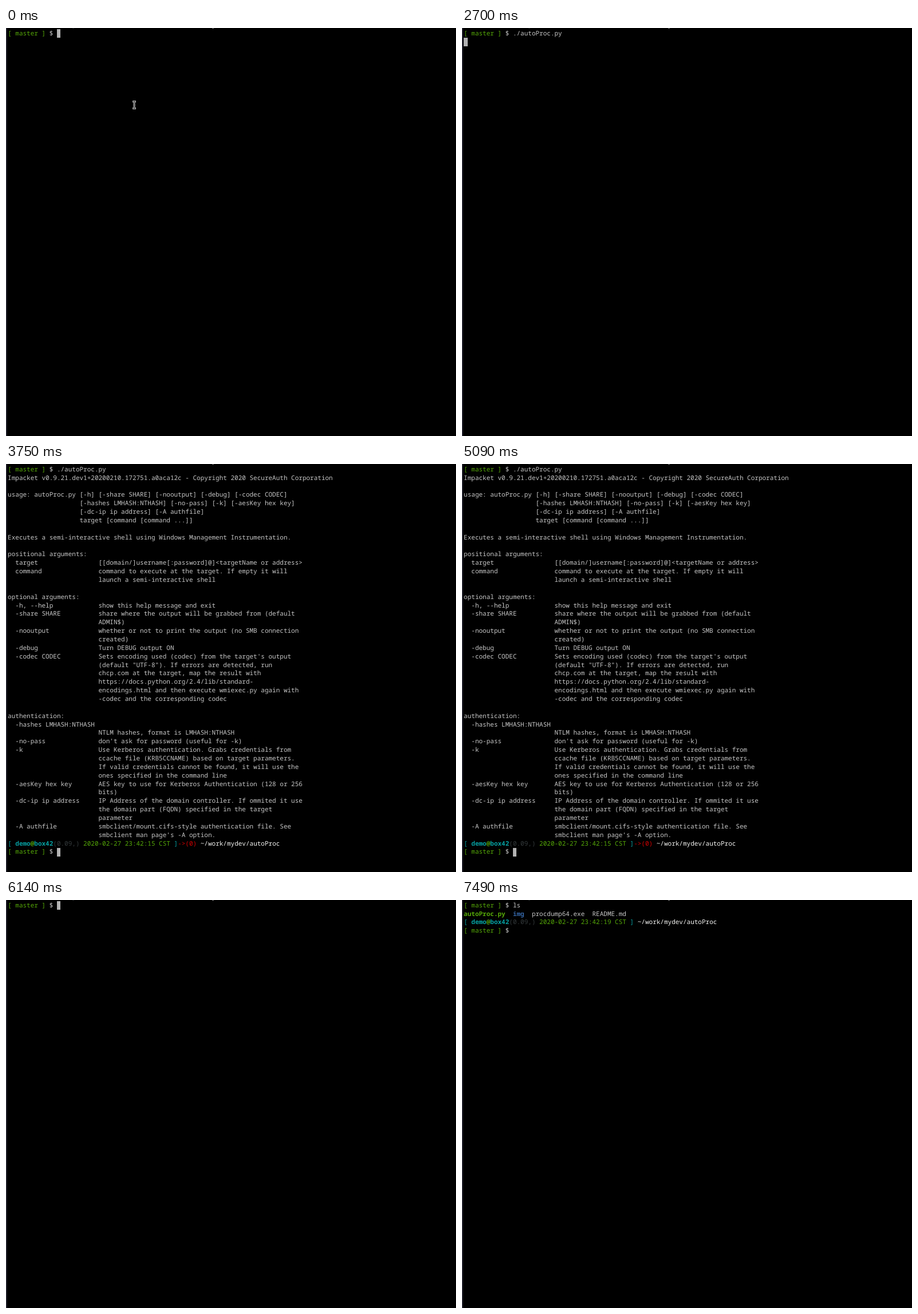
Animation, 786 px wide and 713 px high, one loop 8 s. Source, as an HTML page:

```html
<!DOCTYPE html>
<html lang="en">
<head>
<meta charset="utf-8">
<title>Terminal session</title>
<style>
  html, body { margin: 0; width: 100%; height: 100%; overflow: hidden; background: #000; }
  #stage { position: relative; width: 786px; height: 713px; overflow: hidden; background: #000; }
  #stage > * { position: absolute; }
  #edge { left: 0; top: 0; width: 2px; height: 100%; background: #20202a; }
  .speck { top: 0; height: 1px; width: 3px; }
  #screen {
    left: 3.1px; top: 2.75px; margin: 0; color: #c6c6c6;
    font: 500 11px/14.86px "Noto Sans Mono", monospace;
    text-rendering: geometricPrecision; font-variant-ligatures: none;
  }
  #cursor { width: 6.6px; height: 14.86px; background: #b2b2b2; }
  #pointer { left: 219px; top: 126px; }
  .green { color: #55a808; }
  .cyan { color: #06a0a2; }
  .blue { color: #3465a4; }
  .red { color: #d40000; }
  .dim { color: #343a3c; }
  .white { color: #f4f4f2; }
</style>
</head>
<body>
<div id="stage">
  <div id="edge"></div>
  <div class="speck" style="left:116px; background:#1c2021"></div>
  <div class="speck" style="left:360px; background:#777"></div>
  <pre id="screen"></pre>
  <div id="cursor"></div>
  <svg id="pointer" width="10" height="18" fill="none">
    <path d="M2 2.5H8M5 2.5V14.5M2 14.5H8" stroke="#ccc" stroke-width="3"/>
    <path d="M2.5 2.5H7.5M5 2.5V14.5M2.5 14.5H7.5" stroke="#222"/>
  </svg>
</div>
<script>
const LOOP = 8000, CELL = 6.6, ROW = 14.86, LEFT = 3.1, TOP = 2;

const paint = (color, text) => `<span class="${color}">${text}</span>`;
const bold = (color, text) => `<b class="${color}">${text}</b>`;

const prompt = paint("green", "[ master ]") + " $ ";
const PROMPT_COLS = 13;

const status = (time, code = " ") =>
  paint("cyan", "[ ") + bold("cyan", "demo") + bold("green", "@") + bold("cyan", "box42") +
  paint("dim", "(0.09,)") + paint("green", ` 2020-02-27 ${time} CST `) + paint("cyan", "]") +
  paint("red", code) + paint("white", "~/work/mydev/autoProc") + "\n";

const help = `Impacket v0.9.21.dev1+20200210.172751.a0aca12c - Copyright 2020 SecureAuth Corporation

usage: autoProc.py [-h] [-share SHARE] [-nooutput] [-debug] [-codec CODEC]
                   [-hashes LMHASH:NTHASH] [-no-pass] [-k] [-aesKey hex key]
                   [-dc-ip ip address] [-A authfile]
                   target [command [command ...]]

Executes a semi-interactive shell using Windows Management Instrumentation.

positional arguments:
  target                [[domain/]username[:password]@]&lt;targetName or address&gt;
  command               command to execute at the target. If empty it will
                        launch a semi-interactive shell

optional arguments:
  -h, --help            show this help message and exit
  -share SHARE          share where the output will be grabbed from (default
                        ADMIN$)
  -nooutput             whether or not to print the output (no SMB connection
                        created)
  -debug                Turn DEBUG output ON
  -codec CODEC          Sets encoding used (codec) from the target's output
                        (default "UTF-8"). If errors are detected, run
                        chcp.com at the target, map the result with
                        https://docs.python.org/2.4/lib/standard-
                        encodings.html and then execute wmiexec.py again with
                        -codec and the corresponding codec

authentication:
  -hashes LMHASH:NTHASH
                        NTLM hashes, format is LMHASH:NTHASH
  -no-pass              don't ask for password (useful for -k)
  -k                    Use Kerberos authentication. Grabs credentials from
                        ccache file (KRB5CCNAME) based on target parameters.
                        If valid credentials cannot be found, it will use the
                        ones specified in the command line
  -aesKey hex key       AES key to use for Kerberos Authentication (128 or 256
                        bits)
  -dc-ip ip address     IP Address of the domain controller. If ommited it use
                        the domain part (FQDN) specified in the target
                        parameter
  -A authfile           smbclient/mount.cifs-style authentication file. See
                        smbclient man page's -A option.
`;

const running = prompt + "./autoProc.py\n";
const helped = running + help + status("23:42:15", "-&gt;(0) ");
const listed = prompt + "ls\n" + bold("green", "autoProc.py") + "  " + bold("blue", "img") +
  "  procdump64.exe  README.md\n" + status("23:42:19");

// A step holds its start, the finished lines, the typed input (null: no prompt) and the cursor state.
const steps = [];
const add = (at, done, typed = "", cursor = true) => steps.push({ at, done, typed, cursor });
const type = (done, keys) => keys.forEach(([at, typed]) => add(at, done, typed));

type("", [[0, ""], [1050, "."], [1350, "./"], [1650, "./a"], [1800, "./au"], [1950, "./autoProc.py "]]);
add(2700, running, null);
[3000, 3150, 3750, 4490, 5090].forEach((at, i) => add(at, helped, "", i % 2 === 0));
type(helped, [[5390, "c"], [5540, "cle"], [5690, "clea"], [5840, "clear"]]);
type("", [[6140, ""], [6590, "l"], [6740, "ls"]]);
add(6890, listed);
add(7490, listed, "", false);

const [screen, cursor, pointer] = ["screen", "cursor", "pointer"].map(id => document.getElementById(id));
let shown;

function show({ done, typed, cursor: lit }) {
  const atPrompt = typed !== null;
  screen.innerHTML = done + (atPrompt ? prompt + typed : "");
  const row = done.split("\n").length - 1;
  const col = atPrompt ? PROMPT_COLS + typed.length : 0;
  cursor.style.left = LEFT + col * CELL + "px";
  cursor.style.top = TOP + row * ROW + "px";
  cursor.style.visibility = lit ? "visible" : "hidden";
}

function frame() {
  const t = performance.now() % LOOP;
  const step = steps.findLast(s => s.at <= t);
  if (step !== shown) show(shown = step);
  pointer.style.visibility = t < 900 ? "visible" : "hidden";
  requestAnimationFrame(frame);
}
frame();
</script>
</body>
</html>
```
